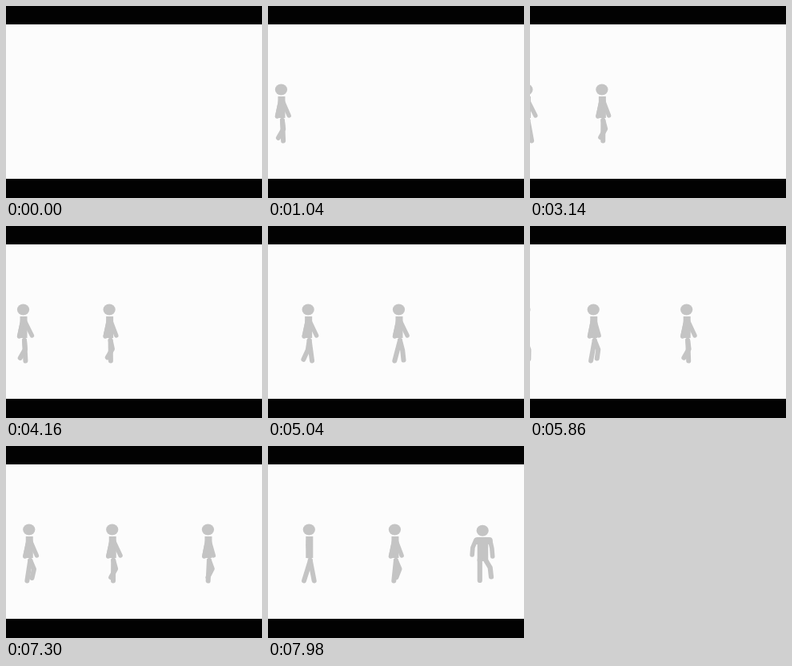
These frames come from a looping animation (320x240 px, 8 s). An HTML page with a canvas:

```html
<!DOCTYPE html>
<html lang="en">
<head>
<meta charset="utf-8">
<title>Walking figures</title>
<style>
  html, body { margin: 0; width: 100%; height: 100%; overflow: hidden; background: #020202; }
  canvas { display: block; width: 320px; height: 240px; }
</style>
</head>
<body>
<canvas id="stage" width="320" height="240"></canvas>
<script>
const ctx = document.getElementById('stage').getContext('2d');
const LOOP = 8000;
const GAP = 2900;        // ms between one walker and the next
const ENTER = 60;        // age in ms at which a walker comes into view
const TURN = 7700;       // the first walker turns to the front
const SWING_TIME = 1020; // ms for one arm swing
const GREY = '#c4c4c4';

// speed in px/ms, stepTime in ms, phases in steps and swings
const walkers = [
  { speed: 0.0395, stepTime: 344, legPhase: 0.28, armPhase: 0.14 },
  { speed: 0.0382, stepTime: 310, legPhase: 0.22, armPhase: 0.8 },
  { speed: 0.0381, stepTime: 296, legPhase: 0.64, armPhase: 0.36 }
];

// Slow start at the left edge, then a steady pace
const position = (speed, age) => speed * age - 36 + 28 * Math.exp(-age / 1150);

function head(y) {
  ctx.beginPath();
  ctx.ellipse(0, y, 7.6, 7, 0, 0, Math.PI * 2);
  ctx.fill();
}

function limb(width, ...points) {
  ctx.lineWidth = width;
  ctx.beginPath();
  points.forEach(p => ctx.lineTo(...p));
  ctx.stroke();
}

function leg(footX, footY, bend) {
  const hip = [1.5, 143];
  const knee = [(hip[0] + footX) / 2 + bend, (hip[1] + footY) / 2];
  limb(6, hip, knee, [footX, footY]);
}

function sideView(steps, swings) {
  const s = steps % 1;
  const lift = Math.sin(Math.PI * s);
  const swing = Math.abs(Math.cos(Math.PI * swings));
  const back = -5 * Math.min(1, swing * 1.6);

  head(104.5);
  ctx.fillRect(-4, 113, 9, 27);

  // Rear arm, filled in towards the body
  ctx.beginPath();
  ctx.moveTo(-4, 121);
  ctx.lineTo(back - 2.7, 138);
  ctx.lineTo(2, 139);
  ctx.fill();
  limb(5.4, [-1, 119], [back, 138]);
  limb(5.4, [1.5, 118], [1 + 10 * swing, 137]);

  leg(6.5 - 12.5 * s, 168.5, 0);
  leg(-6.3 + 12.5 * s * s * (3 - 2 * s), 168.5 - 4.5 * lift, 4.6 * lift);
}

function frontView(u) {
  const out = 3 * (1 - u);
  head(105.7);
  ctx.beginPath();
  ctx.roundRect(-10.5, 114, 23, 9, 4);
  ctx.fill();
  ctx.fillRect(-6.5, 116, 13.5, 28);
  limb(5.6, [-8.5, 118], [-12.3, 127], [-13, 136]);
  limb(5.6, [9.5, 118], [11.5 + out, 128], [12.3 + out, 138]);
  limb(6.2, [-3.4, 142], [-3.4, 168]);
  limb(6.2, [3.5, 142], [9.5, 152], [10.8, 163.5]);
}

function drawWalker(walker, i, t) {
  const age = t - i * GAP;
  if (age < ENTER) return;
  ctx.save();
  ctx.translate(position(walker.speed, Math.min(age, TURN)), 0);
  if (age >= TURN) {
    frontView((age - TURN) / (LOOP - TURN));
  } else {
    sideView(age / walker.stepTime + walker.legPhase, age / SWING_TIME + walker.armPhase);
  }
  ctx.restore();
}

function draw(t) {
  ctx.fillStyle = '#020202';
  ctx.fillRect(0, 0, 320, 240);
  ctx.fillStyle = '#fcfcfc';
  ctx.fillRect(0, 23, 320, 193);
  ctx.fillStyle = ctx.strokeStyle = GREY;
  ctx.lineCap = ctx.lineJoin = 'round';
  walkers.forEach((walker, i) => drawWalker(walker, i, t));
}

const start = performance.now();
function tick() {
  draw((performance.now() - start) % LOOP);
  requestAnimationFrame(tick);
}
tick();
</script>
</body>
</html>
```
